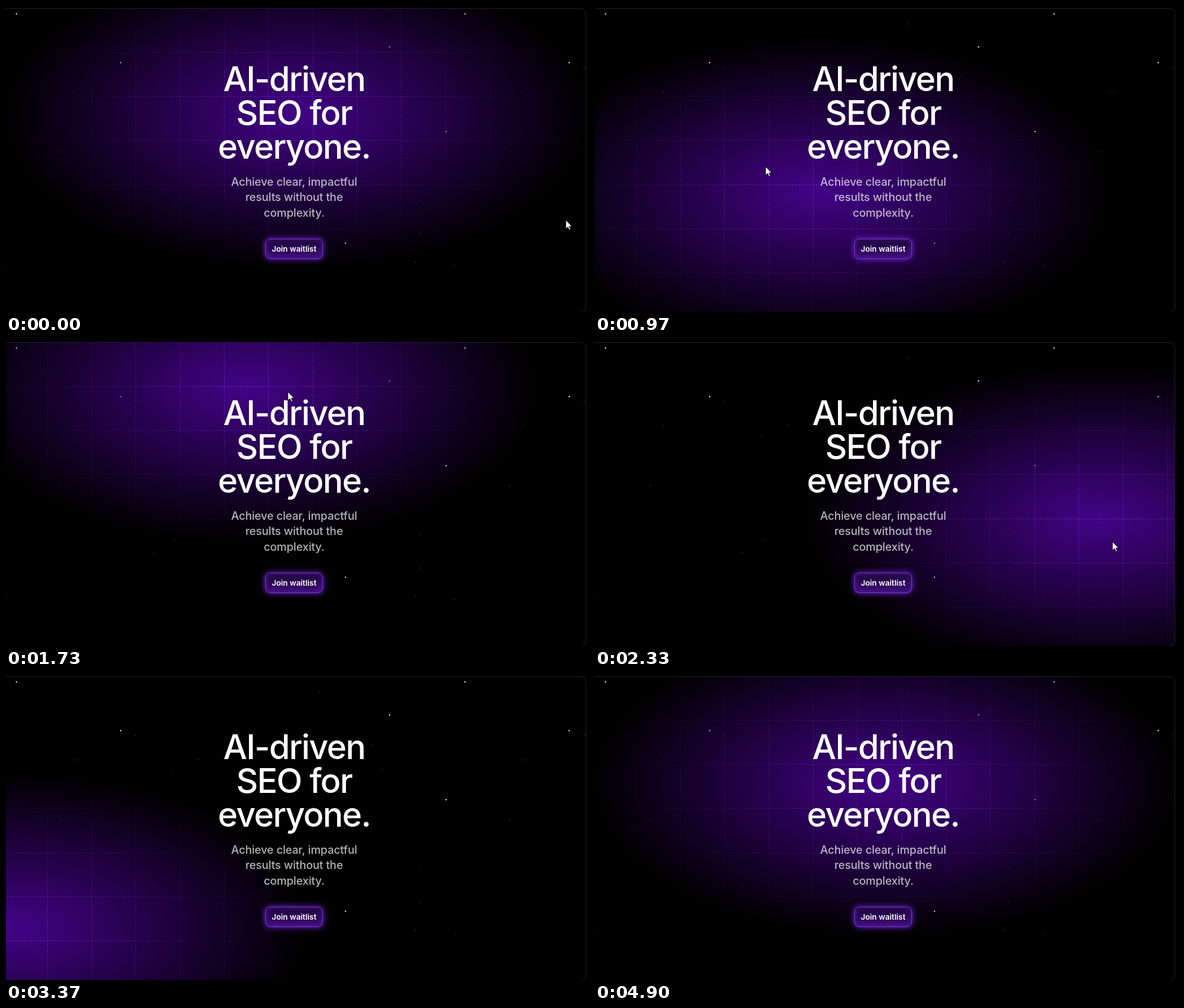
Recreate the animation shown at these times as an HTML page with a canvas. Size 1032 px wide and 543 px high, loop 4.93 s.

```html
<!DOCTYPE html>
<html lang="en">
<head>
<meta charset="utf-8">
<title>Hero spotlight</title>
<style>
  html, body { margin: 0; width: 100%; height: 100%; overflow: hidden; background: #000; }
  #stage {
    position: relative; width: 1032px; height: 543px; overflow: hidden;
    background: #000; color: #fff; font-family: Inter, Arial, sans-serif; text-align: center;
  }
  #stage > * { position: absolute; margin: 0; }
  canvas { left: 0; top: 0; }
  .card {
    left: -20px; top: 4px; width: 1047px; height: 540px; box-sizing: border-box;
    border: 1px solid rgba(255, 255, 255, .14); border-radius: 10px;
  }
  h1 {
    left: 310px; top: 99px; width: 400px;
    font-size: 60px; line-height: 60px; font-weight: 500; letter-spacing: -.03em;
  }
  p {
    left: 310px; top: 298.6px; width: 400px;
    font-size: 19.8px; line-height: 27.6px; font-weight: 500; letter-spacing: -.007em;
    color: rgba(255, 255, 255, .7);
  }
  .join {
    left: 459px; top: 413px; width: 102px; height: 36px; box-sizing: border-box;
    border: 1px solid #7a35d0; border-radius: 8px;
    background: linear-gradient(#1d0638, #3d0d76);
    box-shadow: 0 0 12px #7426dc, inset 0 0 10px rgba(110, 40, 210, .5);
    font-size: 13.7px; line-height: 34px; font-weight: 600; white-space: nowrap;
  }
  #cursor { left: 0; top: 0; overflow: visible; }
</style>
</head>
<body>
<div id="stage">
  <div class="card"></div>
  <canvas id="sky" width="1032" height="543"></canvas>
  <h1>AI-driven<br>SEO for<br>everyone.</h1>
  <p>Achieve clear, impactful<br>results without the<br>complexity.</p>
  <div class="join">Join waitlist</div>
  <svg id="cursor" width="14" height="20">
    <path d="M0 0V15.4L3.6 12L6 17.4L8.4 16.4L6 11.1H10.8Z" fill="#fff" stroke="#000" stroke-width=".9"/>
  </svg>
</div>
<script>
const W = 1032, H = 543, LOOP = 4930, FRAME = LOOP / 148;
const LAG = 90, FADE = 330, LEAVE = 3430;
const REST = [513.5, 193], RX = 513, RY = 270;
const CELL = 78.35, TILE = 794, DIM_STARS = 19;

// turning points of the pointer: time, x, y
const ROUTE = [
  [0, 991, 380], [500, 800, 425], [670, 612, 422], [1225, 147, 175],
  [1730, 499, 92], [2290, 910, 340], [2600, 760, 465], [3300, -20, 450]
];
const BRIGHT_STARS = [[18.5, 14], [203, 100.5], [679, 72.5], [779, 223], [601, 421]];

const makeCanvas = () => Object.assign(document.createElement('canvas'), { width: W, height: H });
const view = document.getElementById('sky').getContext('2d');
const arrow = document.getElementById('cursor');
const grid = makeCanvas(), stars = makeCanvas(), spot = makeCanvas();
const spotCtx = spot.getContext('2d');

function drawGrid(g) {
  g.beginPath();
  g.roundRect(-20, 4, 1046, 540, 10);
  g.clip();
  g.fillStyle = 'rgb(66,3,134)';
  g.fillRect(0, 0, W, H);
  g.strokeStyle = 'rgba(116,36,222,.85)';
  g.setLineDash([4, 2]);
  g.beginPath();
  const snap = v => Math.floor(v) + .5;
  for (let x = 73; x < W; x += CELL) { g.moveTo(snap(x), 4); g.lineTo(snap(x), H); }
  for (let y = 82; y < H; y += CELL) { g.moveTo(0, snap(y)); g.lineTo(W, snap(y)); }
  g.stroke();
}

function drawStars(g) {
  let seed = 7;
  const random = () => (seed = seed * 16807 % 2147483647) / 2147483647;
  const star = (x, y, size, light) => {
    g.fillStyle = `rgba(255,255,255,${light})`;
    for (const cx of [x, x + TILE]) {
      g.beginPath();
      g.arc(cx, y, size / 2, 0, 7);
      g.fill();
    }
  };
  for (const [x, y] of BRIGHT_STARS) star(x, y, 2.4, .95);
  for (let i = 0; i < DIM_STARS; i++) star(random() * TILE, 5 + random() * 495, 1.2, .5);
}

// smooth curve through the route points
function pointer(t) {
  const last = ROUTE.length - 1;
  if (t <= 0) return ROUTE[0].slice(1);
  if (t >= ROUTE[last][0]) return ROUTE[last].slice(1);
  const i = ROUTE.findIndex(p => p[0] > t) - 1;
  const a = ROUTE[i], b = ROUTE[i + 1], span = b[0] - a[0], u = (t - a[0]) / span;
  const slope = (k, c) => {
    const p = ROUTE[Math.max(k - 1, 0)], n = ROUTE[Math.min(k + 1, last)];
    return (n[c] - p[c]) / (n[0] - p[0]) * span;
  };
  return [1, 2].map(c => {
    const d = b[c] - a[c], m = slope(i, c), n = slope(i + 1, c);
    return a[c] + u * (m + u * (3 * d - 2 * m - n + u * (m + n - 2 * d)));
  });
}

function drawSpot([x, y], alpha) {
  if (alpha <= 0) return;
  const g = spotCtx;
  g.clearRect(0, 0, W, H);
  g.save();
  g.translate(x, y);
  g.scale(RX, RY);
  const fade = g.createRadialGradient(0, 0, 0, 0, 0, 1);
  fade.addColorStop(0, '#000');
  fade.addColorStop(1, 'rgba(0,0,0,0)');
  g.fillStyle = fade;
  g.fillRect(-1, -1, 2, 2);
  g.restore();
  g.globalCompositeOperation = 'source-in';
  g.drawImage(grid, 0, 0);
  g.globalCompositeOperation = 'source-over';
  view.globalAlpha = alpha;
  view.drawImage(spot, 0, 0);
  view.globalAlpha = 1;
}

function ease(u) {
  u = Math.min(1, Math.max(0, u));
  return u * u * (3 - 2 * u);
}

function render(t) {
  const hover = ease(t / FADE) - ease((t - LEAVE) / FADE);
  view.clearRect(0, 0, W, H);
  view.drawImage(stars, 0, 0);
  drawSpot(REST, 1 - hover);
  drawSpot(pointer(t - LAG), hover);
  const [x, y] = pointer(t);
  arrow.style.transform = `translate(${Math.round(x)}px, ${Math.round(y)}px)`;
}

drawGrid(grid.getContext('2d'));
drawStars(stars.getContext('2d'));

const start = performance.now();
function tick() {
  const t = (performance.now() - start) % LOOP;
  const step = Math.floor((t + 4) / FRAME) % 148;
  render(Math.round(step * FRAME / 10) * 10);
  requestAnimationFrame(tick);
}
tick();
</script>
</body>
</html>
```
